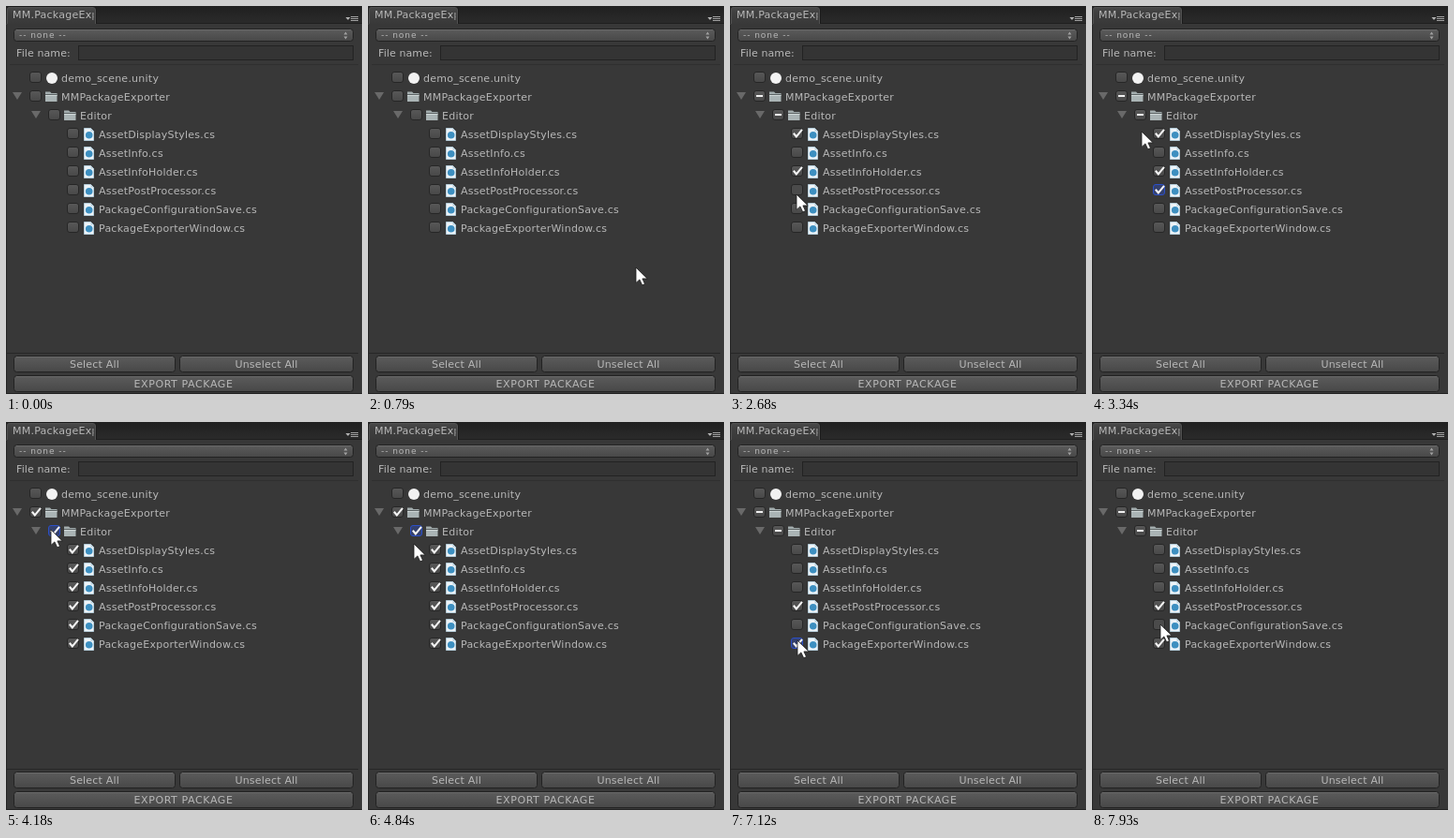
An HTML page that plays this animation: 380 px wide and 414 px high, repeating every 8 s.

```html
<!DOCTYPE html>
<html lang="en">
<head>
<meta charset="utf-8">
<title>Package exporter</title>
<style>
  html, body { margin: 0; width: 100%; height: 100%; overflow: hidden; background: #383838; }
  svg { display: block; width: 380px; height: 414px; }
  text { font: 11px "DejaVu Sans", sans-serif; letter-spacing: .24px; fill: #b8b8b8; white-space: pre; }
  .mini { font-size: 9px; letter-spacing: .95px; }
</style>
</head>
<body>
<svg id="stage" viewBox="0 0 380 414">
  <defs>
    <linearGradient id="bar" x2="0" y2="1"><stop stop-color="#202020"/><stop offset="1" stop-color="#2b2b2b"/></linearGradient>
    <linearGradient id="tab" x2="0" y2="1"><stop stop-color="#4a4a4a"/><stop offset=".3" stop-color="#404040"/><stop offset="1" stop-color="#383838"/></linearGradient>
    <linearGradient id="btn" x2="0" y2="1"><stop stop-color="#5c5c5c"/><stop offset="1" stop-color="#484848"/></linearGradient>
    <linearGradient id="box" x2="0" y2="1"><stop stop-color="#585858"/><stop offset="1" stop-color="#484848"/></linearGradient>
    <clipPath id="tabClip"><path d="M0 0h93.5v20H0z"/></clipPath>
  </defs>
</svg>
<script>
const LOOP = 8000;
const stage = document.getElementById('stage');

function add(tag, attrs, text) {
  const el = document.createElementNS('http://www.w3.org/2000/svg', tag);
  for (const k in attrs) el.setAttribute(k, attrs[k]);
  if (text) el.textContent = text;
  return stage.appendChild(el);
}
const rect = (x, y, width, height, fill, more) => add('rect', { x, y, width, height, fill, ...more });
const path = (d, fill, more) => add('path', { d, fill, ...more });
const label = (x, y, text, more) => add('text', { x, y, ...more }, text);

function button(x, y, w, h, text, spacing = .2) {
  rect(x + .5, y + .5, w - 1, h - 1, 'url(#btn)', { rx: 3, stroke: '#222' });
  path(`M${x + 3} ${y + 1.5}h${w - 6}`, 'none', { stroke: '#6a6a6a' });
  if (text) label(x + w / 2, y + h / 2 + 4, text, { 'text-anchor': 'middle', style: `letter-spacing:${spacing}px` });
}

function foldout(x, y) {
  path(`M${x} ${y - 5}h10l-5 8z`, '#696969');
}

function folder(x, y) {
  path(`M${x} ${y - 2}v-3.5h5l1.5 1.5h6v2z`, '#a3adae');
  path(`M${x} ${y - 2.5}h12.5`, 'none', { stroke: '#5c6364' });
  path(`M${x} ${y - 2}h12.5v7h-12.5z`, '#aab4b5');
  path(`M${x} ${y - 1.5}h12.5`, 'none', { stroke: '#d0d8d8' });
}

function script(x, y) {
  path(`M${x + .5} ${y - 6.5}h7l3 3v10h-10z`, '#eef4f8', { stroke: '#b5ccd8' });
  path(`M${x + 7.5} ${y - 6.5}v3h3`, '#b9d0dc');
  add('circle', { cx: x + 5.7, cy: y + .8, r: 3.8, fill: '#3d8fc0' });
}

// A tri-state checkbox: state is 0 (off), 1 (on) or 2 (mixed).
function checkbox(x, y) {
  const box = rect(x + .5, y - 6.5, 12, 11, 'url(#box)', { rx: 2.5, stroke: '#262626' });
  const tick = path(`M${x + 2.8} ${y - 1.2}l3 3.5l6.2 -7.4`, 'none', { stroke: '#f4f4f4', 'stroke-width': 2.1 });
  const dash = rect(x + 3, y - 2, 7, 2, '#f0f0f0');
  return (state, focused, active) => {
    box.setAttribute('stroke', focused ? '#2b4fc8' : '#262626');
    box.setAttribute('fill', focused ? '#34406c' : active ? '#4b4b4b' : 'url(#box)');
    tick.setAttribute('visibility', state === 1 ? 'visible' : 'hidden');
    dash.setAttribute('visibility', state === 2 ? 'visible' : 'hidden');
  };
}

// Window frame and header
rect(0, 0, 380, 414, '#383838');
rect(0, 0, 380, 19, 'url(#bar)');
path('M97 18.5H380', 'none', { stroke: '#1f1f1f' });
path('M1 20V4q0 -3 3 -3h89q3 0 3 3v16z', 'url(#tab)');
path('M1.5 19V4q0 -2.5 2.5 -2.5h89q2.5 0 2.5 2.5v15', 'none', { stroke: '#505050' });
path('M96.5 19V4q0 -3.5 -3.5 -3.5H4', 'none', { stroke: '#1b1b1b' });
label(7, 13, 'MM.PackageExporter', { 'clip-path': 'url(#tabClip)' });
path('M362.5 12h5l-2.5 3z', '#b4b4b4');
path('M368 11.5h8M368 13.5h8M368 15.5h8', 'none', { stroke: '#a0a0a0' });
path('M.5 20V414M0 413.5H380', 'none', { stroke: '#232323' });

button(8, 24, 363, 14);
label(14, 34, '-- none --', { class: 'mini' });
path('M360.5 30.5l2 -3l2 3zM360.5 32.5l2 3l2 -3z', '#a0a0a0');
label(11, 54, 'File name:', { style: 'letter-spacing:.1px' });
rect(77.5, 42.5, 293, 15, '#343434', { stroke: '#222' });
path('M4 62.5H376', 'none', { stroke: '#2f2f2f' });

// Tree
checkbox(25, 77)(0);
add('circle', { cx: 49, cy: 77, r: 6, fill: '#f2f2f2' });
label(59, 81, 'demo_scene.unity');

foldout(7, 97);
const rootBox = checkbox(25, 97);
folder(42, 97);
label(59, 101, 'MMPackageExporter');

foldout(27, 117);
const groupBox = checkbox(45, 117);
folder(62, 117);
label(79, 121, 'Editor');

const files = ['AssetDisplayStyles', 'AssetInfo', 'AssetInfoHolder',
  'AssetPostProcessor', 'PackageConfigurationSave', 'PackageExporterWindow'];
const fileBoxes = files.map((name, i) => {
  const y = 137 + 20 * i;
  script(83, y);
  label(99, y + 4, name + '.cs');
  return checkbox(65, y);
});

// Footer
path('M1 370.5H376', 'none', { stroke: '#272727' });
button(8, 373, 173, 18, 'Select All');
button(185, 373, 186, 18, 'Unselect All');
button(8, 394, 363, 18, 'EXPORT PACKAGE', .6);

const cursor = path('M0 0V16.4L3.9 12.9L6.7 18.8L9.5 17.6L6.9 11.9H12.2z', '#fff',
  { stroke: '#1c1c1c', 'stroke-width': .8 });

// Clicks: press time, release time, file index (GROUP toggles every file)
const GROUP = -1;
const clicks = [
  [1540, 1750, 0], [2110, 2440, 2], [2680, 2950, 3], [3820, 4180, GROUP],
  [4960, 5350, GROUP], [6190, 6370, 3], [6790, 7120, 5], [7930, 9000, 4]
];

// Pointer moves: start, end, x, y, optional curve control point
const moves = [
  [520, 1270, 63, 139, 230, 407], [1330, 1360, 63, 138], [1480, 1570, 67, 136],
  [1750, 2110, 70, 173], [2440, 2680, 71, 201], [2920, 3520, 48, 115],
  [4210, 4510, 48, 154], [4630, 4960, 49, 120], [5530, 5950, 72, 189, 57, 169],
  [6130, 6190, 71, 193], [6370, 6640, 74, 233], [6760, 6820, 72, 233],
  [7180, 7450, 73, 244], [7510, 7870, 73, 216]
];

function pointer(t) {
  let x = 372, y = 197;
  for (const [t0, t1, ex, ey, cx = (x + ex) / 2, cy = (y + ey) / 2] of moves) {
    if (t <= t0) break;
    const u = Math.min(1, (t - t0) / (t1 - t0));
    const s = u * u * (3 - 2 * u);
    const curve = (a, c, b) => a * (1 - s) ** 2 + 2 * c * s * (1 - s) + b * s * s;
    x = curve(x, cx, ex);
    y = curve(y, cy, ey);
  }
  return [Math.round(x), Math.round(y)];
}

function draw(time) {
  const t = Math.floor((time - 10) / 30) * 30 + 10;
  const on = files.map(() => false);
  let focus = null, active = null;
  for (const [down, up, target] of clicks) {
    if (t < down) break;
    focus = null;
    active = target;
    if (t < up) break;
    active = null;
    focus = target;
    if (target === GROUP) on.fill(!on.every(Boolean));
    else on[target] = !on[target];
  }
  const group = on.every(Boolean) ? 1 : on.some(Boolean) ? 2 : 0;
  rootBox(group);
  groupBox(group, focus === GROUP, active === GROUP);
  fileBoxes.forEach((set, i) => set(+on[i], focus === i, active === i));

  const [x, y] = pointer(t);
  cursor.setAttribute('transform', `translate(${x} ${y})`);
  cursor.setAttribute('visibility', t < 100 ? 'hidden' : 'visible');
}

const start = performance.now();
function tick() {
  draw((performance.now() - start) % LOOP);
  requestAnimationFrame(tick);
}
tick();
</script>
</body>
</html>
```
